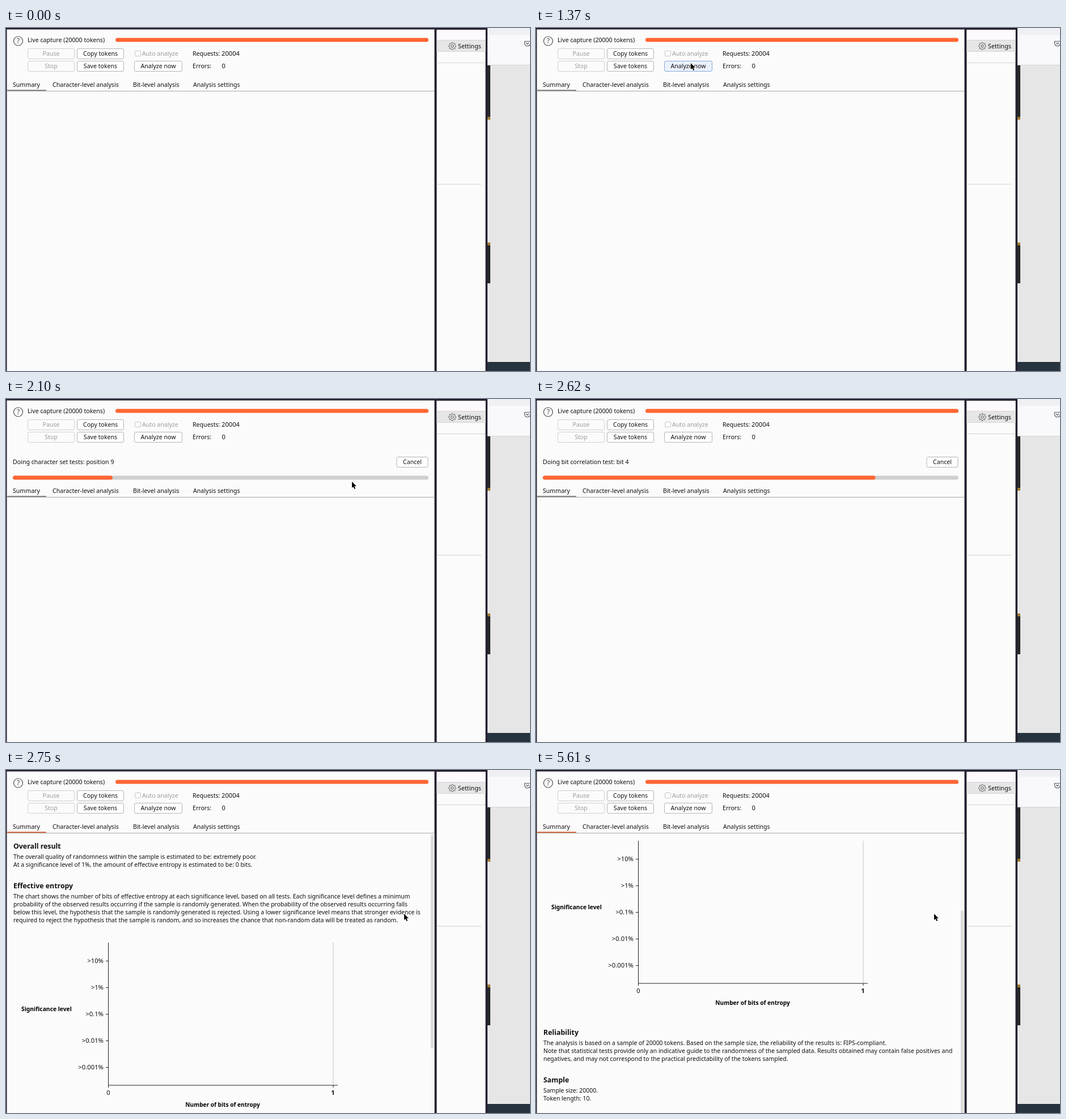
Animation of 924 by 606 pixels, one loop 8 s. Source, as an HTML page with a canvas:

```html
<!DOCTYPE html>
<html lang="en">
<head>
<meta charset="utf-8">
<title>Token analysis</title>
<style>
html, body { margin: 0; width: 100%; height: 100%; overflow: hidden; background: #fbfbfb; }
canvas { display: block; width: 924px; height: 606px; }
</style>
</head>
<body>
<canvas id="stage" width="924" height="606"></canvas>
<script>
const ctx = document.getElementById('stage').getContext('2d');
const LOOP = 8000;
const FAMILY = '"Noto Sans", "Open Sans", sans-serif';
const INK = '#101010', FAINT = '#9c9c9c', ORANGE = '#ff6633', EDGE = '#231f2f', PAPER = '#fbfbfb';
const UI = 10.6, BODY = 10.48, HEAD = 12.35;
const TAB_LINE = 111, PANEL = 62;

const ticks = [0];
for (let i = 0; i < 12; i++) ticks.push(100 + Math.round(i * 730 / 11));
ticks.push(1020, 1290, 1370, 1560, 1830, 1900, 1960, 2030, 2100, 2150, 2280, 2360, 2450, 2540,
  2620, 2680, 2750, 5480, 5550, 5610);

// Pointer path: time, x, y
const path = [
  [100, 877, 595], [240, 730, 450], [430, 470, 215], [600, 325, 90], [720, 276, 56], [830, 270, 66],
  [1020, 273, 62], [1765, 273, 62], [1960, 470, 110], [2100, 610, 146], [2280, 629, 163],
  [2620, 629, 163], [2750, 702, 254]
];

const paragraphs = [
  [135, 'Overall result',
    'The overall quality of randomness within the sample is estimated to be: extremely poor.',
    'At a significance level of 1%, the amount of effective entropy is estimated to be: 0 bits.'],
  [205, 'Effective entropy',
    'The chart shows the number of bits of effective entropy at each significance level, based on all tests. Each significance level defines a minimum',
    'probability of the observed results occurring if the sample is randomly generated. When the probability of the observed results occurring falls',
    'below this level, the hypothesis that the sample is randomly generated is rejected. Using a lower significance level means that stronger evidence is',
    'required to reject the hypothesis that the sample is random, and so increases the chance that non-random data will be treated as random.'],
  [644, 'Reliability',
    'The analysis is based on a sample of 20000 tokens. Based on the sample size, the reliability of the results is: FIPS-compliant.',
    'Note that statistical tests provide only an indicative guide to the randomness of the sampled data. Results obtained may contain false positives and',
    'negatives, and may not correspond to the practical predictability of the tokens sampled.'],
  [728, 'Sample', 'Sample size: 20000.', 'Token length: 10.']
];

function rect(x, y, w, h, color) {
  ctx.fillStyle = color;
  ctx.fillRect(x, y, w, h);
}

function pill(x, y, w, h, r, fill, stroke) {
  ctx.beginPath();
  ctx.roundRect(x, y, w, h, r);
  if (fill) { ctx.fillStyle = fill; ctx.fill(); }
  if (stroke) { ctx.strokeStyle = stroke; ctx.lineWidth = 1; ctx.stroke(); }
}

// y is the visual middle of the line
function text(str, x, y, { size = UI, color = INK, weight = 400, align = 'left' } = {}) {
  ctx.font = `${weight} ${size}px ${FAMILY}`;
  ctx.fillStyle = color;
  ctx.textAlign = align;
  ctx.fillText(str, x, y + 4);
}

function button(label, x, y, w, { off, fill = '#ffffff', stroke } = {}) {
  pill(x + .5, y + .5, w - 1, 18, 2.5, off ? PAPER : fill, stroke || (off ? '#d0d0d0' : '#b4b4b4'));
  text(label, x + w / 2, y + 9, { color: off ? FAINT : INK, align: 'center' });
}

function gear(x, y) {
  ctx.strokeStyle = '#555';
  ctx.lineWidth = 1;
  ctx.beginPath();
  for (let i = 0; i <= 64; i++) {
    const a = i / 64 * Math.PI * 2;
    const r = 5.7 + Math.max(-.8, Math.min(.8, 1.6 * Math.cos(a * 8)));
    ctx.lineTo(x + r * Math.cos(a), y + r * Math.sin(a));
  }
  ctx.closePath();
  ctx.stroke();
  ctx.beginPath();
  ctx.arc(x, y, 2.3, 0, 7);
  ctx.stroke();
}

function backdrop() {
  rect(0, 0, 924, 606, EDGE);

  // Browser window on the right
  rect(849, 0, 75, 12, '#f0f0f4');
  rect(849, 12, 75, 54, '#f9f9fb');
  rect(849, 65, 75, 1, '#d4d4d8');
  rect(849, 66, 75, 525, '#e6e6e6');
  rect(849, 66, 5, 91, '#262a29');
  rect(849, 157, 5, 5, '#a07c34');
  rect(849, 379, 5, 5, '#a07c34');
  rect(849, 384, 5, 67, '#262a29');
  rect(849, 590, 75, 16, '#27333f');
  ctx.strokeStyle = '#5b5b66';
  ctx.lineWidth = 1.2;
  ctx.beginPath();
  ctx.moveTo(924.5, 23.5);
  ctx.lineTo(914.5, 23.5);
  ctx.lineTo(914.5, 27);
  ctx.arc(919.5, 27, 5, Math.PI, 0, true);
  ctx.moveTo(917, 26);
  ctx.lineTo(919.5, 28.5);
  ctx.lineTo(922, 26);
  ctx.stroke();

  // Window in the middle
  rect(759.5, 3, 86, 603, PAPER);
  rect(759.5, 3, 86, 18, '#fdf9fd');
  rect(759.5, 21, 86, 21, '#e6e6e6');
  rect(759.5, 21, 86, 1, '#d6d6d6');
  rect(759.5, 41, 86, 1, '#d6d6d6');
  rect(759.5, 61, 86, 1, '#d2d2d2');
  rect(759.5, 275.5, 78.5, 1, '#cfcfcf');
  gear(787, 32);
  text('Settings', 797, 32, { size: 10.75 });

  rect(1.5, 2.5, 754, 604, PAPER);
}

function toolbar(t) {
  ctx.strokeStyle = '#505050';
  ctx.lineWidth = 1.2;
  ctx.beginPath();
  ctx.arc(21.5, 23, 8, 0, 7);
  ctx.stroke();
  text('?', 21.5, 23.3, { size: 12, color: '#444', align: 'center' });
  text('Live capture (20000 tokens)', 38, 21);
  pill(193, 17.6, 552, 7, 3.5, ORANGE);

  button('Pause', 38, 36, 83, { off: true });
  button('Stop', 38, 58, 83, { off: true });
  button('Copy tokens', 125, 36, 83);
  button('Save tokens', 125, 58, 83);
  pill(227.5, 40.5, 10, 9, 1, '#fdfdfd', '#c4c4c4');
  text('Auto analyze', 240, 45, { color: FAINT });

  let look = {};
  if (t >= 1290 && t < 1370) look = { fill: '#dde6f4', stroke: '#87a9dc' };
  else if (t >= 1370 && t < 1830) look = { fill: '#ebf1fb', stroke: '#87a9dc' };
  button('Analyze now', 226, 58, 85, look);

  text('Requests:', 329, 45);
  text('20004', 380, 45, { size: 11.2 });
  text('Errors:', 329, 67);
  text('0', 380.5, 67, { size: 11.2 });
}

function tabs(dy, done) {
  text('Summary', 12, 100 + dy);
  text('Character-level analysis', 82, 100 + dy);
  text('Bit-level analysis', 224, 100 + dy);
  text('Analysis settings', 330, 100 + dy);
  rect(1.5, TAB_LINE + dy, 754, 1, '#a9a9a9');
  rect(1.5, TAB_LINE - 2 + dy, 69.5, 2, done ? '#d8704a' : '#8c8c8c');
}

function progress(t) {
  const p = Math.max(0, .24 + (t - 2100) * .56 / 520);
  const label = t < 2150
    ? 'Doing character set tests: position ' + Math.floor(p * 38)
    : 'Doing bit correlation test: bit ' + Math.max(0, Math.floor((p - .29) * 7.9));
  text(label, 12, 111);
  button('Cancel', 688.5, 102, 56);
  pill(12, 135.5, 733, 7, 3.5, '#cfcfcf');
  if (p > 0) pill(12, 135.5, Math.max(7, 733 * p), 7, 3.5, ORANGE);
}

function chart() {
  rect(576.5, 305, 1, 252, '#c6c6c6');
  rect(180, 305, 1, 252, '#222');
  rect(180, 556.5, 405, 1, '#222');
  ['10', '1', '0.1', '0.01', '0.001'].forEach((v, i) => {
    const y = 337 + i * 47;
    rect(176, y, 4, 1, '#222');
    text(`>${v}%`, 172, y, { size: 11.3, align: 'right' });
  });
  rect(180, 557, 1, 4, '#222');
  rect(576.5, 557, 1, 4, '#222');
  text('0', 180.5, 570, { size: 11.2, align: 'center' });
  text('1', 576.5, 570, { size: 11.2, weight: 700, align: 'center' });
  text('Significance level', 27, 422, { size: 10.3, weight: 700, color: '#000' });
  text('Number of bits of entropy', 382, 591, { size: 10.15, weight: 700, color: '#000', align: 'center' });
}

function results(t) {
  const offset = t < 5480 ? 0 : t < 5550 ? 55 : t < 5610 ? 118 : 180;
  const thumb = offset < 60 ? 114 : 114 + offset * .745;
  ctx.save();
  ctx.beginPath();
  ctx.rect(1.5, TAB_LINE + 1, 754, 606);
  ctx.clip();
  ctx.translate(0, -offset);
  for (const [y, title, ...lines] of paragraphs) {
    text(title, 13, y, { size: HEAD, weight: 700 });
    lines.forEach((line, i) => text(line, 13, y + 18 + i * 14, { size: BODY }));
  }
  chart();
  ctx.translate(0, offset);
  rect(748, TAB_LINE, 7.5, 495, '#f7f7f7');
  pill(749, thumb, 5, 378, 2.5, '#dcdcdc');
  ctx.restore();
}

function pointer(t) {
  if (t < 100 || (t >= 2620 && t < 2680)) return;
  let [, x, y] = path[path.length - 1];
  for (let i = 1; i < path.length; i++) {
    const [t0, x0, y0] = path[i - 1], [t1, x1, y1] = path[i];
    if (t < t1) {
      const k = (t - t0) / (t1 - t0);
      x = x0 + (x1 - x0) * k;
      y = y0 + (y1 - y0) * k;
      break;
    }
  }
  ctx.save();
  ctx.translate(Math.round(x), Math.round(y));
  ctx.beginPath();
  for (const [px, py] of [[0, 0], [0, 11], [2.5, 8.9], [4.4, 13], [6.2, 12.2], [4.4, 8.1], [7.8, 7.9]]) ctx.lineTo(px, py);
  ctx.closePath();
  ctx.strokeStyle = '#fff';
  ctx.lineWidth = 1.4;
  ctx.stroke();
  ctx.fillStyle = '#000';
  ctx.fill();
  ctx.restore();
}

function draw(now) {
  const time = now % LOOP;
  const t = ticks.filter(v => v <= time).pop() || 0;
  const busy = t >= 1560 && t < 2680, done = t >= 2680;
  backdrop();
  toolbar(t);
  if (busy) progress(t);
  if (done) results(t);
  tabs(busy ? PANEL : 0, done);
  pointer(t);
}

const start = performance.now();
function loop() {
  draw(performance.now() - start);
  requestAnimationFrame(loop);
}
loop();
</script>
</body>
</html>
```
